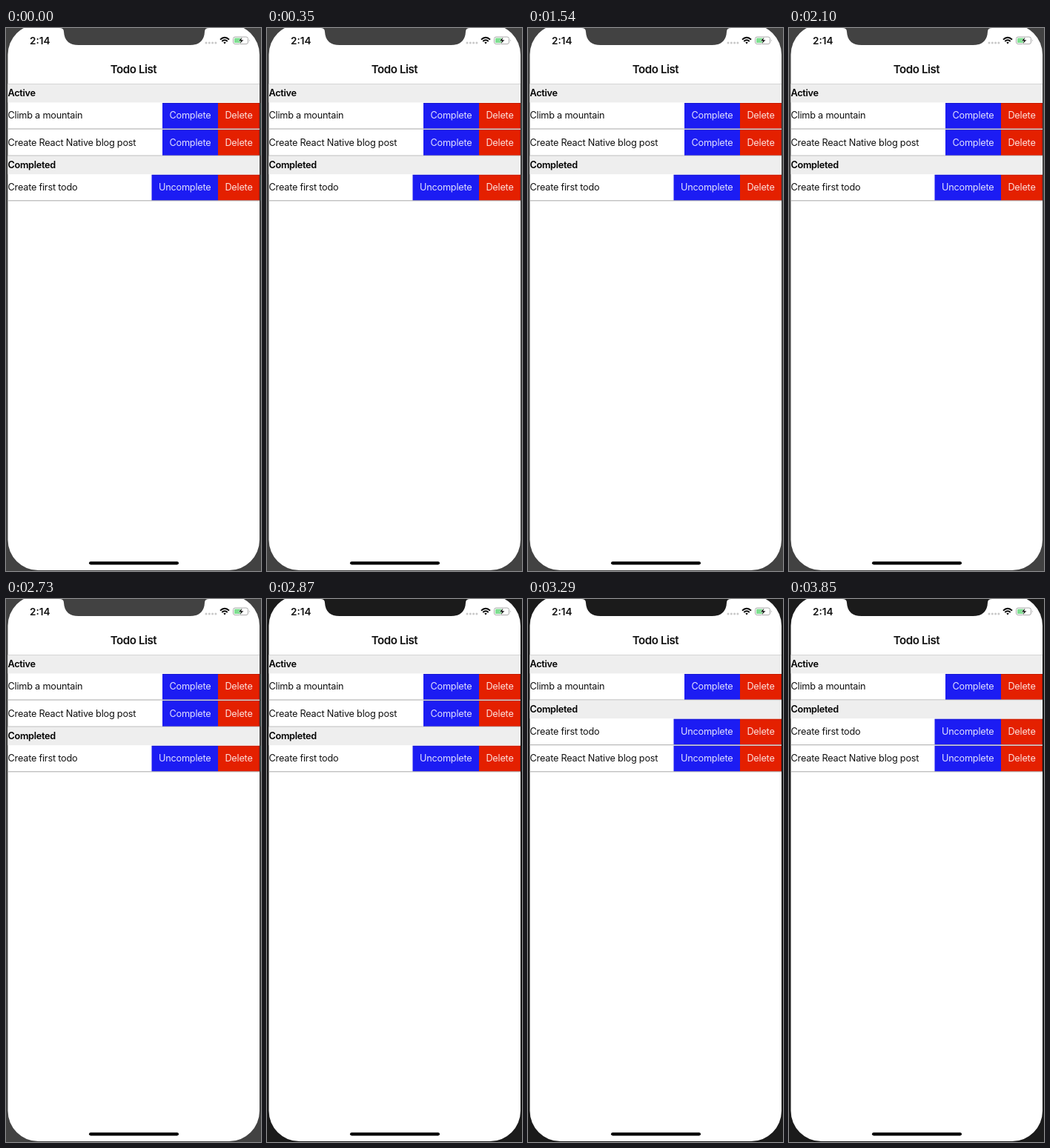
Recreate the animation shown at these times as an HTML page. Size 344 by 732 pixels, loop 3990 ms.

```html
<!DOCTYPE html>
<html lang="en">
<head>
<meta charset="utf-8">
<title>Todo List</title>
<style>
  html, body { margin: 0; width: 100%; height: 100%; overflow: hidden; background: #404040; }
  svg { display: block; width: 344px; height: 732px; }
  text { font: 400 12.7px Inter, Roboto, sans-serif; letter-spacing: -.21px; fill: #111; }
  .head { font-weight: 600; letter-spacing: -.3px; fill: #000; }
  .title { font-weight: 600; font-size: 15.1px; letter-spacing: -.45px; }
  .time { font-weight: 600; font-size: 13.5px; letter-spacing: 0; }
  .button { fill: #fff; fill-opacity: .87; }
</style>
</head>
<body>
<svg viewBox="0 0 344 732">
  <rect id="bezel" width="344" height="732"/>
  <rect x="2.5" y="-5" width="339.5" height="736" rx="41" fill="#fff"/>
  <path d="M2.5 75.5H342" stroke="#cfcfcf"/>
  <path id="notch" d="M72 0Q78 0 78 5Q79 23 98 23H248Q267 23 268 5Q268 0 274 0Z"/>

  <text class="time" x="32" y="21.5">2:14</text>
  <text class="title" x="172" y="61" text-anchor="middle">Todo List</text>

  <g fill="#c8c8c8">
    <circle cx="270" cy="20" r="1.5"/><circle cx="274.3" cy="20" r="1.5"/>
    <circle cx="278.6" cy="20" r="1.5"/><circle cx="282.9" cy="20" r="1.5"/>
  </g>
  <g fill="none" stroke="#000" stroke-width="2">
    <path d="M289 15.6Q295 9.8 301 15.6M291.3 18Q295 14.6 298.7 18"/>
    <path d="M293.3 19.4Q295 18 296.7 19.4L295 21.5Z" fill="#000" stroke="none"/>
  </g>
  <rect x="306.5" y="12" width="20" height="9.6" rx="2.6" fill="#fff" stroke="#aaa"/>
  <path d="M328 15.2Q329.8 16.8 328 18.4Z" fill="#aaa"/>
  <rect x="308" y="13.5" width="9" height="6.6" rx="1.2" fill="#7fdf91"/>
  <path d="M319 11.8L313.6 17.4H316.8L315 22L320.6 16H317.4Z" fill="#000" stroke="#fff" stroke-width=".5"/>

  <g id="list"></g>
  <rect x="112" y="719.2" width="121" height="4.2" rx="2.1" fill="#000"/>
</svg>
<script>
const LOOP = 3990, DARKEN = 2800, COMPLETE = 2940;
const HEADER_HEIGHT = 24.6, ROW_HEIGHT = 36.1;
const byId = id => document.getElementById(id);

const button = (label, x, right, y, color) => `
  <rect x="${x}" y="${y + .6}" width="${right - x}" height="${ROW_HEIGHT - 1.2}" fill="${color}"/>
  <path d="M${x} ${y + 1.1}H${right}" stroke="#000" stroke-opacity=".15"/>
  <text class="button" x="${(x + right) / 2}" y="${y + 22}" text-anchor="middle">${label}</text>`;

const header = (label, y) => `
  <rect x="2.5" y="${y}" width="339.5" height="${HEADER_HEIGHT}" fill="#eee"/>
  <text class="head" x="2.5" y="${y + 16.6}">${label}</text>`;

const row = (label, y, done) => `
  <text x="2.5" y="${y + 22}">${label}</text>
  ${button(done ? 'Uncomplete' : 'Complete', done ? 196.5 : 211, 286, y, '#1c1cf3')}
  ${button('Delete', 286, 342, y, '#e42000')}
  <path d="M341.5 ${y + .6}v${ROW_HEIGHT - 1.2}" stroke="#700" stroke-opacity=".4"/>
  <path d="M2.5 ${y + ROW_HEIGHT - .5}H342" stroke="#a8a8a8"/>`;

function listMarkup(active, completed) {
  let y = 75.8, markup = '';
  for (const [title, items, done] of [['Active', active, false], ['Completed', completed, true]]) {
    markup += header(title, y);
    y += HEADER_HEIGHT;
    for (const item of items) {
      markup += row(item, y, done);
      y += ROW_HEIGHT;
    }
  }
  return markup;
}

const mountain = 'Climb a mountain', blog = 'Create React Native blog post', first = 'Create first todo';
const before = listMarkup([mountain, blog], [first]);
const after = listMarkup([mountain], [first, blog]);
let shown;

function draw(now) {
  const t = now % LOOP;
  const color = t < DARKEN ? '#424242' : '#1b1b1b';
  byId('bezel').setAttribute('fill', color);
  byId('notch').setAttribute('fill', color);
  const list = t < COMPLETE ? before : after;
  if (list !== shown) byId('list').innerHTML = shown = list;
}

const start = performance.now();
function tick() {
  draw(performance.now() - start);
  requestAnimationFrame(tick);
}
tick();
</script>
</body>
</html>
```
